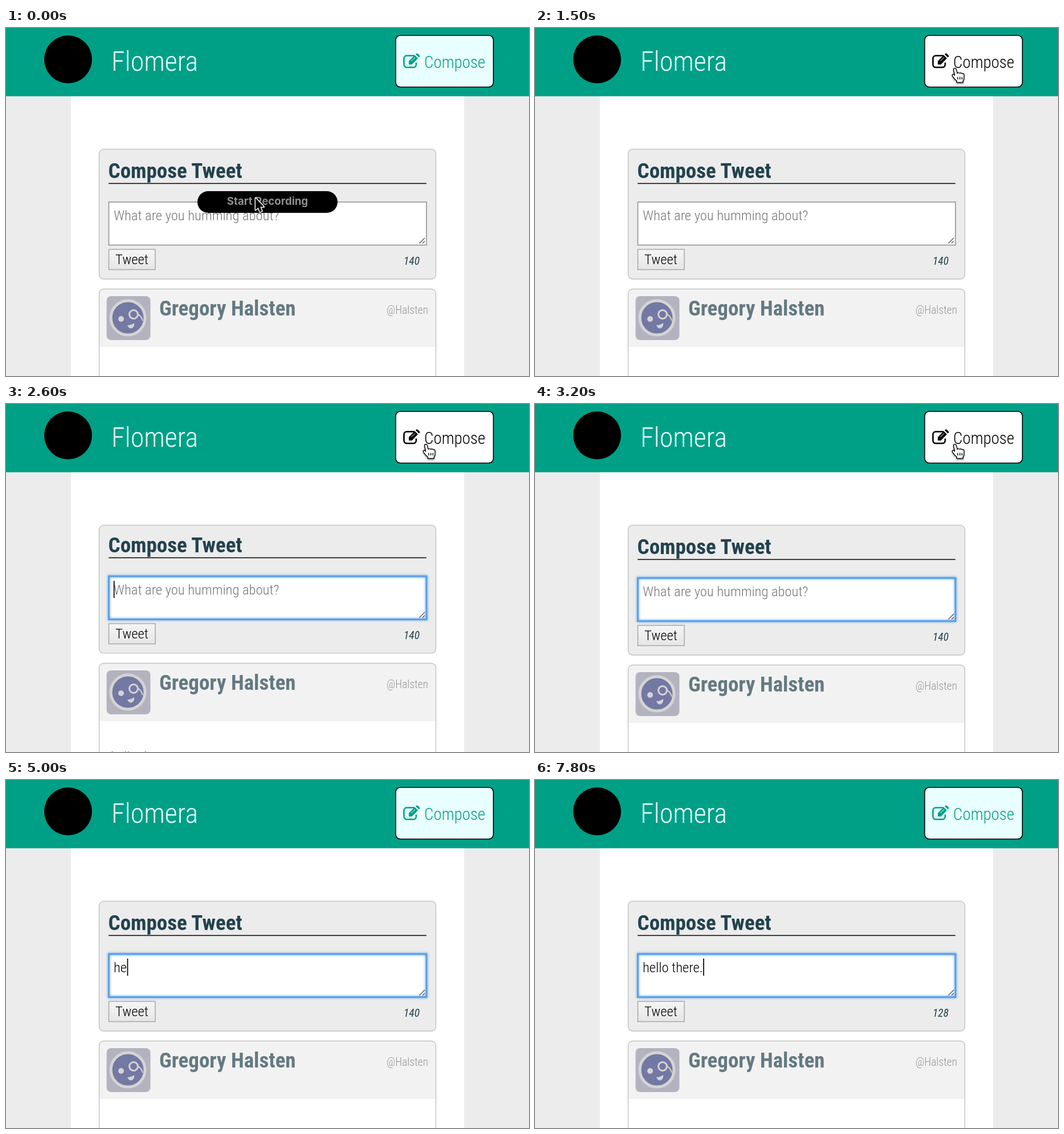
Recreate the animation shown at these times as an HTML page. Size 918 px wide and 610 px high, loop 8000 ms.

```html
<!DOCTYPE html>
<html lang="en">
<head>
<meta charset="utf-8">
<title>Compose box demo</title>
<style>
  html, body { margin: 0; width: 918px; height: 610px; overflow: hidden; background: #ececec; }
  svg { display: block; }
  text { font: 350 24.6px 'Roboto Condensed', Roboto, sans-serif; font-stretch: condensed; white-space: pre; }
  .end { text-anchor: end; }
  .brand { font-size: 48px; fill: #e8feff; }
  .action { font-size: 29px; fill: currentColor; }
  .title { font-size: 37px; font-weight: 700; fill: #22424f; }
  .name { font-size: 37px; font-weight: 700; fill: #647a82; }
  .handle { font-size: 19.4px; fill: #969696; }
  .body { fill: #1c3642; }
  .age { font-size: 15.5px; font-weight: 400; fill: #24434f; }
  .count { font-size: 19.5px; font-style: italic; font-weight: 400; fill: #24434f; }
  #pill text { font: 700 18.7px Inter, sans-serif; font-stretch: normal; text-anchor: middle; fill: #8f8f93; }
  /* used only when no condensed cut of the font is installed */
  .narrow text:not(.plain) { transform: scaleX(.87); transform-box: fill-box; transform-origin: 0 0; }
  .narrow text.end { transform-origin: 100% 0; }
  #ring { filter: drop-shadow(0 0 2px #4f9be8); }
  #cursor { filter: drop-shadow(0 2px 1.5px #0006); }
</style>
</head>
<body>
<svg id="stage" width="918" height="610" viewBox="0 0 918 610">
  <defs>
    <linearGradient id="shade" x2="0" y2="1">
      <stop stop-color="#f5f5f5"/><stop offset="1" stop-color="#e6e6e6"/>
    </linearGradient>
  </defs>
  <rect width="918" height="610" fill="#ececec"/>
  <rect x="114" y="119" width="690" height="491" fill="#fff"/>

  <g id="cards"></g>

  <rect id="box" x="163.5" y="212.5" width="591" rx="8" fill="#ececec" stroke="#c2c2c2" stroke-width="1.4"/>
  <svg id="clip" y="212" width="918">
    <g id="content">
      <text id="title" class="title" x="179.6" y="51">Compose Tweet</text>
      <path d="M180 60.5H738" stroke="#000" stroke-width="1.6"/>
      <rect x="180.5" y="93" width="557.5" height="75.5" fill="#fff" stroke="#858585" stroke-width="1.4"/>
      <rect id="ring" x="180.5" y="93" width="557.5" height="75.5" fill="none" stroke="#5a9fe8" stroke-width="3"/>
      <path d="M725.5 165.5L735 156M731 165.5L735 161.5" stroke="#555" stroke-width="1.4"/>
      <text id="entry" x="189" y="125"></text>
      <rect id="caret" y="101" width="1.7" height="30"/>
      <rect x="180.5" y="176" width="81.5" height="35.5" fill="url(#shade)" stroke="#a3a3a3" stroke-width="1.4"/>
      <text x="192" y="202">Tweet</text>
      <text id="count" class="count end" x="726" y="203">140</text>
    </g>
  </svg>

  <rect width="918" height="119.6" fill="#00a087"/>
  <circle cx="109" cy="55" r="42"/>
  <text class="brand" x="185" y="75">Flomera</text>
  <g id="button">
    <rect id="face" x="684" y="13" width="171.5" height="90.5" rx="8" stroke="#000" stroke-width="1.6"/>
    <path d="M717 48.5H703.5a5 5 0 0 0-5 5V64a5 5 0 0 0 5 5H715a5 5 0 0 0 5-5V60.5" fill="none" stroke="currentColor" stroke-width="2.6"/>
    <path d="M707 64V58L717.5 47.5L723 53L712.5 64ZM719 46L720.5 44.8Q721.8 44 723 45L726 48Q727 49.3 726 50.5L724.6 51.6Z" fill="currentColor"/>
    <path d="M711.5 58L718 51.5" stroke="#fff"/>
    <text class="action" x="734" y="69.5">Compose</text>
  </g>

  <g id="pill">
    <rect x="336" y="286" width="246" height="38" rx="19"/>
    <text class="plain" x="459" y="310">Start Recording</text>
  </g>

  <g id="cursor" stroke-linejoin="round">
    <path id="arrow" d="M0 0V21L4.7 16.7 7.8 24.4 11.3 22.9 8.2 15.4H14.5Z" stroke="#fff" stroke-width="3" paint-order="stroke"/>
    <g id="hand" stroke="#000" stroke-width="1.5" transform="translate(-.5 1) scale(.92)">
      <path fill="#fff" d="M-1 13L-3 3a2.6 2.6 0 0 1 5-1.5L4 9q2-2 4.5 0q2.5-1.5 4.5.7q3-.8 4 2v6q0 4-2 6v3H3v-3q-4-3-8-9q-1.5-2.5.3-3.5q2-1 3.7 2z"/>
      <path d="M5 16v5M9 16v5M13 16v5"/>
    </g>
  </g>
</svg>
<script>
const $ = id => document.getElementById(id);
const LOOP = 8000, STEP = 100, OPEN = 229;
const HINT = 'What are you humming about?', MESSAGE = 'hello there.';
const KEYS = [5000, 5000, 5130, 5250, 5370, 5500, 5630, 5750, 5870, 6000, 6200, 7500];

const star = (x, y) => '<path d="M' + Array.from({ length: 10 }, (_, i) => {
  const a = (i / 5 - .55) * Math.PI, r = i % 2 ? 4 : 8.5;
  return [x + r * Math.cos(a), y + r * Math.sin(a)].map(v => v.toFixed(1));
}).join('L') + 'Z" fill="#e2e6e2"/>';

const wink = `<circle cx="-12" cy="2" r="5" fill="#d4d4d6"/>
  <circle cx="10" cy="-6" r="7.5" fill="none" stroke="#d4d4d6" stroke-width="3"/>
  <path d="M18-6Q23-4 26 5" fill="none" stroke="#d4d4d6" stroke-width="2"/>
  <path d="M-1 13Q6 13 11 9Q12 17 6 18.500Q1 18.500-1 13Z" fill="#d4d4d6"/>`;
const grin = star(-12, 0) + star(12, -2) +
  '<path d="M-17 10Q0 26 18 8" fill="none" stroke="#e2e6e2" stroke-width="3.5" stroke-linecap="round"/>';

const card = (y, name, handle, [back, rim, skin], face, body, age) => `
  <g transform="translate(0 ${y})">
    <rect x="163.5" y=".5" width="591" height="281" rx="8" fill="#fff"/>
    <path d="M164 102V8.5a8 8 0 0 1 8-8H746a8 8 0 0 1 8 8V102Z" fill="#f2f2f2"/>
    <path d="M164 232.5H754" stroke="#dedede" stroke-width="1.3"/>
    <rect x="163.5" y=".5" width="591" height="281" rx="8" fill="none" stroke="#c2c2c2" stroke-width="1.4"/>
    <rect x="176.5" y="13" width="77" height="77" rx="8" fill="${back}"/>
    <g transform="translate(214 51)">
      <circle r="30" fill="${skin}" stroke="${rim}" stroke-width="5"/>${face}
    </g>
    <text class="name" x="269" y="47">${name}</text>
    <text class="handle end" x="741" y="44">${handle}</text>
    <text class="body" x="184" y="173">${body}</text>
    <text class="age" x="177" y="264">${age}</text>
  </g>`;

$('cards').innerHTML =
  card(0, 'Gregory Halsten', '@Halsten', ['#b3b3c0', '#d4d4d3', '#7379a2'], wink, 'hello there insta-tweet!!', '10 days ago') +
  card(298, 'Norbin', '@SirOrvan', ['#90dce9', '#dce0da', '#4a9fdc'], grin, '', '');

const squeeze = $('title').getComputedTextLength() > 252 ? .87 : 1;
if (squeeze < 1) $('stage').classList.add('narrow');

const progress = (t, from, to) => Math.min(1, Math.max(0, (t - from) / (to - from)));
const swing = p => .5 - Math.cos(p * Math.PI) / 2;
const show = (id, on) => $(id).setAttribute('display', on ? 'inline' : 'none');
const set = (id, name, value) => $(id).setAttribute(name, value);

function drawPanel(t) {
  const opening = t >= 2415;
  const shown = opening ? swing(progress(t, 2415, 2615)) : 1 - swing(progress(t, 1600, 1800));
  const shift = OPEN * shown, height = Math.max(0, shift - 1);
  set('cards', 'transform', `translate(0 ${228 + Math.round(shift)})`);
  show('box', height > 0);
  show('clip', height > 0);
  set('box', 'height', Math.max(0, height - .5));
  set('clip', 'height', height);
  // the focused field keeps the content scrolled to its end while opening
  set('content', 'transform', `translate(0 ${opening ? Math.round(shift - OPEN) : 0})`);
  show('ring', opening);
}

function drawEntry(t) {
  const typed = KEYS.filter(k => k <= t);
  const entry = $('entry');
  entry.textContent = typed.length ? MESSAGE.slice(0, typed.length) : HINT;
  entry.setAttribute('fill', typed.length ? '#000' : '#757575');
  $('count').textContent = 140 - KEYS.filter(k => k + 100 <= t).length;
  const since = t - (typed.length ? typed.at(-1) : 2400);
  const waiting = t >= 4400 && t < 5000;
  show('caret', since >= 0 && (waiting || since % 1000 < 500));
  set('caret', 'x', typed.length ? 189.5 + entry.getComputedTextLength() * squeeze : 188.8);
}

function drawPointer(t) {
  const go = swing(progress(t, 400, 1250)), back = swing(progress(t, 3600, 4200));
  const x = 438 + 300 * go - 74 * back, y = 298 - 228 * go + 74 * back;
  const hover = x > 684 && x < 856 && y > 12 && y < 104;
  set('cursor', 'transform', `translate(${x} ${y})`);
  show('cursor', t < 5000);
  show('hand', hover);
  show('arrow', !hover);
  set('face', 'fill', hover ? '#fff' : '#e8feff');
  set('button', 'color', hover ? '#000' : '#00a087');
}

function frame(now) {
  const t = Math.floor(now % LOOP / STEP) * STEP;
  set('pill', 'opacity', 1 - progress(t, 0, 200));
  drawPanel(t);
  drawEntry(t);
  drawPointer(t);
  requestAnimationFrame(frame);
}
frame(0);
</script>
</body>
</html>
```
